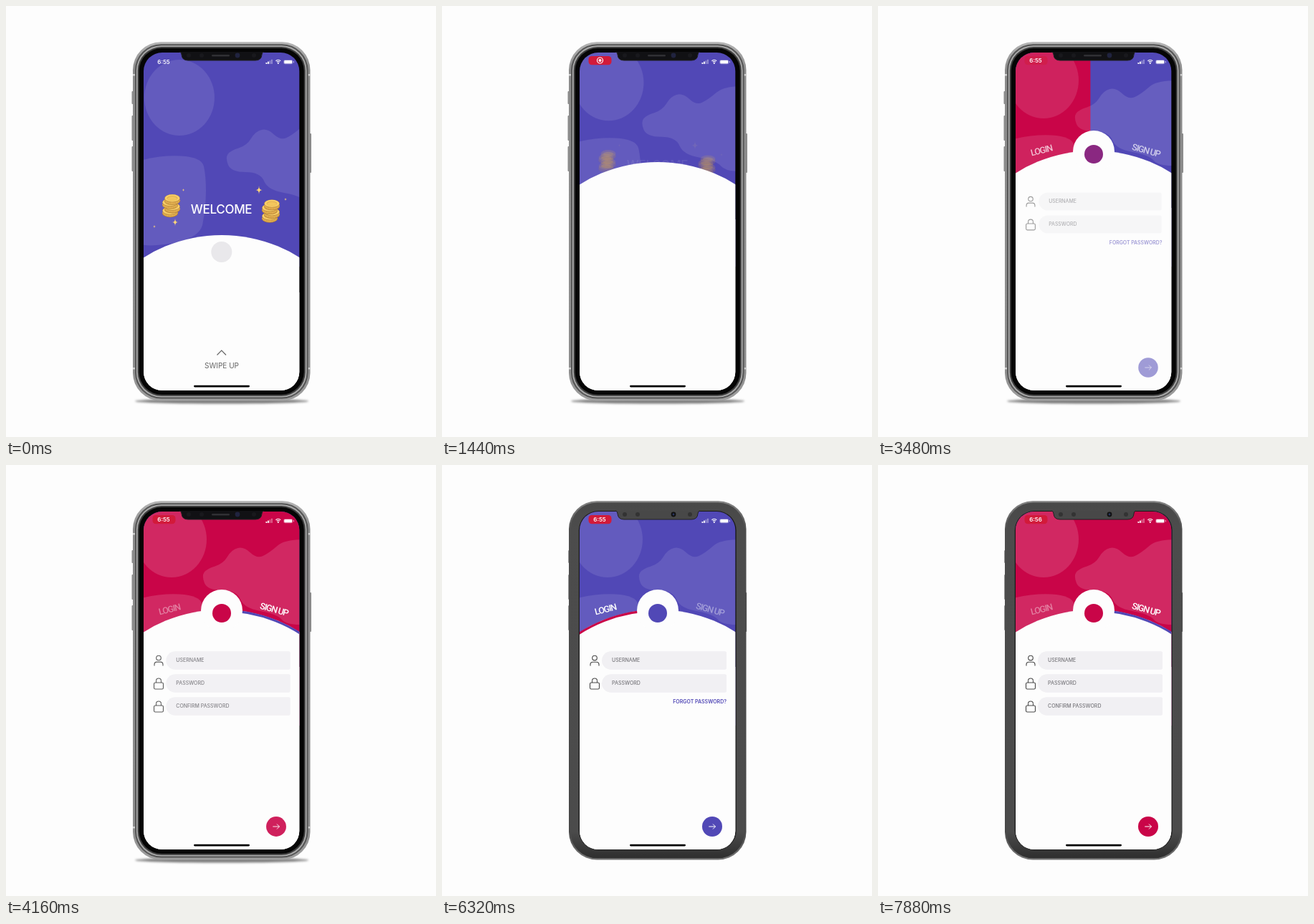
Recreate the animation shown at these times as an HTML page with a canvas. Size 600x602 px, loop 7920 ms.

```html
<!DOCTYPE html>
<html lang="en">
<head>
<meta charset="utf-8">
<title>Login and sign up</title>
<style>
html, body { margin: 0; width: 100%; height: 100%; overflow: hidden; background: #fdfdfd; }
canvas { display: block; width: 600px; height: 602px; }
</style>
</head>
<body>
<canvas id="stage"></canvas>
<script>
const LOOP = 7920, WIPE = 560, TAU = Math.PI * 2;
const TO_SIGNUP = 3205, TO_LOGIN = 4682, TO_SIGNUP_2 = 6640;
const HILL = 205, TOP = 202;
const PURPLE = [81, 72, 182], PINK = [201, 5, 72], WHITE = '#fdfdfd';
const canvas = document.getElementById('stage');
const dpr = window.devicePixelRatio || 1;
canvas.width = 600 * dpr;
canvas.height = 602 * dpr;
const c = canvas.getContext('2d');

const clamp = v => Math.max(0, Math.min(1, v));
const mix = (a, b, k) => a + (b - a) * k;
const rgb = a => `rgb(${a.map(Math.round).join(',')})`;
const ramp = (t, from, ms) => clamp((t - from) / ms);
const ease = k => k < .5 ? 4 * k ** 3 : 1 - 4 * (1 - k) ** 3;
const move = (t, from, ms) => ease(ramp(t, from, ms));
const shown = (t, from, to) => ramp(t, from, 400) * (1 - ramp(t, to, 600));

function box(x, y, w, h, r, fill) {
  c.beginPath();
  c.roundRect(x, y, w, h, r);
  if (fill) { c.fillStyle = fill; c.fill(); }
}
// Nested bodies of the phone, inset from its outline
function shell(inset, fill) {
  box(177 + inset, 50.3 + inset, 247.5 - 2 * inset, 501.2 - 2 * inset, 39 - inset * .85, fill);
}
function oval(x, y, rx, ry, fill) {
  c.beginPath();
  c.ellipse(x, y, rx, ry, 0, 0, TAU);
  c.fillStyle = fill;
  c.fill();
}
const disc = (x, y, r, fill) => oval(x, y, r, r, fill);
function line(color, width, ...pts) {
  c.beginPath();
  pts.forEach(p => c.lineTo(...p));
  c.strokeStyle = color;
  c.lineWidth = width;
  c.stroke();
}
function ring(x, y, r, width, color, from = 0, to = TAU) {
  c.beginPath();
  c.arc(x, y, r, from, to);
  c.strokeStyle = color;
  c.lineWidth = width;
  c.stroke();
}
function text(str, x, y, font, color, align = 'left', spacing = 0) {
  c.font = font;
  c.letterSpacing = spacing + 'px';
  c.fillStyle = color;
  c.textAlign = align;
  c.fillText(str, x, y);
}
const inter = (weight, size) => `${weight} ${size}px Inter, sans-serif`;

function faded(alpha, scale, x, y, draw) {
  if (alpha <= 0) return;
  c.save();
  c.globalAlpha *= alpha;
  c.translate(x, y);
  c.scale(scale, scale);
  c.translate(-x, -y);
  draw();
  c.restore();
}

function vertical(...colors) {
  const g = c.createLinearGradient(0, 50, 0, 552);
  const stops = [0, .08, .92, 1];
  colors.forEach((col, i) => g.addColorStop(stops[i], col));
  return g;
}

function phone(dark) {
  if (!dark) {
    c.save();
    c.filter = 'blur(1.5px)';
    oval(301, 552, 121, 3.5, 'rgba(0,0,0,.5)');
    c.restore();
  }
  const out = dark ? .6 : 1.5;
  for (const y of [119, 153, 196])
    box(177 - out, y, 3, y < 150 ? 18 : 35, 1, dark ? '#555' : '#8b8b8b');
  box(421.5 + out, 178, 3, 55, 1, dark ? '#555' : '#8b8b8b');

  if (dark) {
    shell(0, vertical('#858585', '#4d4d4d', '#484848', '#777'));
    shell(2.2, vertical('#484848', '#4c4c4c', '#4b4b4b', '#2c2c2c'));
    shell(13.8, '#191919');
  } else {
    shell(0, vertical('#b5b5b5', '#8b8b8b', '#8e8e8e', '#a0a0a0'));
    for (const x of [177, 421.5])
      for (const y of [95, 505]) box(x, y, 3, 2.5, 0, '#d0d0d0');
    ['#555', '#a8a8a8', '#3c3c3c', '#050505'].forEach((col, i) => shell(3 + i * 1.9, col));
  }
}

function notch(dark) {
  c.beginPath();
  c.moveTo(242, 64);
  c.quadraticCurveTo(245, 64.5, 245, 68);
  c.quadraticCurveTo(245.5, 76, 254, 76);
  c.lineTo(348, 76);
  c.quadraticCurveTo(356.5, 76, 357, 68);
  c.quadraticCurveTo(357, 64.5, 360, 64);
  c.fillStyle = dark ? '#484848' : '#111114';
  c.fill();
  c.strokeStyle = '#202022';
  c.lineWidth = 1;
  c.stroke();
  for (const x of [255, 273, 346]) disc(x, 69, 3, dark ? '#333' : '#19191d');
  disc(323, 69, 3.4, dark ? '#111' : '#20233f');
  if (dark) disc(323, 69, 1.4, '#29345e');
  else box(287, 68, 25, 2.6, 1.3, '#303034');
}

const cloud = [[273, 155], [280, 145], [303, 138], [315, 118], [332, 114], [350, 131], [367, 123], [390, 103],
  [450, 106], [440, 222], [392, 224], [378, 208], [332, 200], [322, 175], [281, 175]];
const pool = [[150, 197], [213, 179], [271, 182], [277, 208], [277, 250], [268, 300], [150, 310]];

// Closed curve through the midpoints of the given corners
function smooth(pts, dx, dy, fill) {
  const n = pts.length;
  const mid = i => [0, 1].map(k => (pts[i % n][k] + pts[(i + 1) % n][k]) / 2);
  c.save();
  c.translate(dx, dy);
  c.beginPath();
  c.moveTo(...mid(n - 1));
  pts.forEach((p, i) => c.quadraticCurveTo(...p, ...mid(i)));
  c.fillStyle = fill;
  c.fill();
  c.restore();
}

function backdrop(lift, pink) {
  c.fillStyle = rgb(PURPLE);
  c.fillRect(192, 64, 220, 300);
  c.fillStyle = rgb(PINK);
  c.fillRect(192, 64, 218 * pink, 300);
  const light = `rgba(255,255,255,${mix(.1, .14, pink)})`;
  const low = 1 - lift;
  oval(231 + 11 * low, 104 + 24 * low, 49, 53, light);
  smooth(cloud, 33 * low, 57 * low, light);
  smooth(pool, 2 * low, 29 * low, light);
}

function coin(x, y) {
  oval(x, y + 3.7, 11, 5.5, '#b07c33');
  oval(x, y + 3, 10.7, 5.4, '#e8b554');
  for (let i = -4; i <= 4; i++) {
    const dy = 5.3 * Math.sqrt(1 - (i / 4.6) ** 2);
    line('#c08c3a', .6, [x + i * 2.3, y + dy], [x + i * 2.3, y + dy + 2.8]);
  }
  oval(x, y, 10.8, 5.5, '#b98538');
  oval(x, y - .2, 10.4, 5.1, '#f8cf69');
  oval(x, y, 7.4, 3.3, '#dda84a');
  oval(x, y + .3, 6.9, 2.8, '#f3c65c');
}
function stack(x, y) {
  for (let i = 0; i < 4; i++) coin(x + (i % 2) * 3, y - i * 5.8);
}
function spark(x, y, r) {
  c.beginPath();
  c.moveTo(x, y - r);
  for (const [dx, dy] of [[.8, 0], [0, 1], [-.8, 0], [0, -1]])
    c.quadraticCurveTo(x, y, x + dx * r, y + dy * r);
  c.fillStyle = '#f8d27a';
  c.fill();
}
function welcome() {
  stack(229, 286);
  stack(368, 293.5);
  spark(353, 257, 6);
  spark(236, 302, 5.5);
  for (const [x, y] of [[247.5, 257], [390, 270], [207, 308]]) spark(x, y, 2.1);
  text('WELCOME', 300.5, 290, inter(500, 17), '#fff', 'center', -.3);
}

function hill(top) {
  disc(301, top + HILL, HILL, WHITE);
  c.fillRect(190, top + 80, 222, 500);
}

// Each side's rim shows only on the layer of the other colour
function rims(pink) {
  const split = 192 + 218 * pink;
  [[PINK, split, 301], [PURPLE, 301, split]].forEach(([color, from, to]) => {
    if (to <= from) return;
    c.save();
    c.beginPath();
    c.rect(from, TOP - 5, to - from, 60);
    c.clip();
    ring(301, TOP + HILL, HILL - 1.3, 3, rgb(color));
    c.restore();
  });
}

function tab(str, x, y, angle, alpha) {
  c.save();
  c.translate(x, y);
  c.rotate(angle);
  c.globalAlpha *= alpha;
  text(str, 0, 4.5, '500 12.5px Roboto, sans-serif', '#fff', 'center', -1.1);
  c.restore();
}

function userIcon(y) {
  ring(213, y - 3.5, 3.3, 1.15, '#4a4a4a');
  c.beginPath();
  c.moveTo(207, y + 7.5);
  c.arcTo(207, y + 2.2, 213, y + 2.2, 3.5);
  c.arcTo(219, y + 2.2, 219, y + 7.5, 3.5);
  c.lineTo(219, y + 7.5);
  c.stroke();
}
function lockIcon(y) {
  ring(213, y - 3.5, 3.5, 1.15, '#4a4a4a', Math.PI, TAU);
  box(206.5, y - 1, 13, 9, 1.8);
  for (const x of [209.5, 216.5]) {
    c.moveTo(x, y - 3.5);
    c.lineTo(x, y - 1);
  }
  c.stroke();
}

function form(alpha, labels, color) {
  const size = .965 + .035 * alpha;
  labels.forEach((label, i) => {
    const y = 273 + 32 * i;
    faded(alpha, size, 213, y, () => (i ? lockIcon : userIcon)(y));
    faded(alpha, size, 310, y, () => {
      box(223, y - 12.8, 174, 25.6, [12.8, 2, 2, 12.8], '#f1f0f3');
      text(label, 237, y + 2.4, inter(500, 7), '#77767b');
    });
  });
  if (labels.length < 3) faded(alpha, size, 359.5, 330, () =>
    text('FORGOT PASSWORD?', 397, 332.7, inter(600, 7), rgb(color), 'right'));
  faded(alpha, size, 377, 505, () => {
    disc(377, 505, 14, rgb(color));
    line('#fff', 1, [372.3, 505], [381.5, 505]);
    line('#fff', 1, [378, 501.5], [381.5, 505], [378, 508.5]);
  });
}

function status(t, pink) {
  const pill = ramp(t, 500, 60) * (1 - 2 * pink * (1 - pink));
  faded(pill, 1, 0, 0, () => box(204.5, 70, 32, 12.3, 4.5, '#d21a3a'));
  if (t >= 540 && t < 3040) {
    ring(220.5, 76, 4, 1.2, '#fff');
    disc(220.5, 76, 2, '#fff');
  } else {
    const y = t < 540 ? 81 : 79;
    text(t < 7000 ? '6:55' : '6:56', 220, y, inter(600, 8), '#fff', 'center');
  }
  for (let i = 0; i < 4; i++)
    box(362.5 + i * 2.5, 79 - i * 1.4, 1.8, 2 + i * 1.4, .4, i < 2 ? '#fff' : 'rgba(255,255,255,.4)');
  for (const r of [2.7, 4.8]) ring(379.8, 80.2, r, 1.2, '#fff', -2.35, -.79);
  disc(379.8, 80, 1.1, '#fff');
  box(387.3, 75.2, 12.8, 6, 2, 'rgba(255,255,255,.35)');
  box(388.3, 76.1, 10.8, 4.2, 1, '#fff');
  box(400.8, 77, 1.1, 2.4, .6, 'rgba(255,255,255,.6)');
}

function draw(t) {
  c.setTransform(dpr, 0, 0, dpr, 0, 0);
  c.fillStyle = WHITE;
  c.fillRect(0, 0, 600, 602);
  const dark = t >= 4880;
  phone(dark);

  c.save();
  box(192, 65, 217.3, 472, 26);
  c.clip();
  const lift = move(t, 900, 800);
  const pink = move(t, TO_SIGNUP, WIPE) - move(t, TO_LOGIN, WIPE) + move(t, TO_SIGNUP_2, WIPE);
  const top = mix(320, TOP, lift);
  backdrop(lift, pink);
  c.save();
  c.translate(0, -72 * lift);
  faded(1 - ramp(t, 1000, 480), 1, 0, 0, welcome);
  c.restore();
  hill(top);

  faded(1 - ramp(t, 900, 300), 1, 0, 0, () => {
    disc(300.8, top + 23.5, 14.5, '#e9e8eb');
    line('#666', 1.2, [294.5, 487.5], [300.8, 481.2], [307, 487.5]);
    text('SWIPE UP', 301, 505.8, inter(400, 10), '#666', 'center');
  });
  faded(ramp(t, 1800, 350), 1, 0, 0, () => {
    rims(pink);
    tab('LOGIN', 228, 201.5, -.25, mix(1, .4, pink));
    tab('SIGN UP', 374, 201.5, .27, mix(.4, 1, pink));
  });
  const pop = 1 - (1 - ramp(t, 1650, 300)) ** 3;
  faded(pop, pop, 301, 203, () => {
    disc(301, 203, 29, WHITE);
    disc(301, 207, 13, rgb(PURPLE.map((v, i) => mix(v, PINK[i], pink))));
  });

  const login = shown(t, 1950, TO_SIGNUP) + shown(t, TO_LOGIN + WIPE + 40, TO_SIGNUP_2);
  const signup = shown(t, TO_SIGNUP + WIPE + 40, TO_LOGIN) + shown(t, TO_SIGNUP_2 + WIPE + 40, LOOP);
  form(login, ['USERNAME', 'PASSWORD'], PURPLE);
  form(signup, ['USERNAME', 'PASSWORD', 'CONFIRM PASSWORD'], PINK);
  status(t, pink);
  box(262, 529.7, 78, 2.8, 1.4, '#050505');
  c.restore();
  notch(dark);
}

const start = performance.now();
function tick() {
  draw((performance.now() - start) % LOOP);
  requestAnimationFrame(tick);
}
tick();
</script>
</body>
</html>
```
